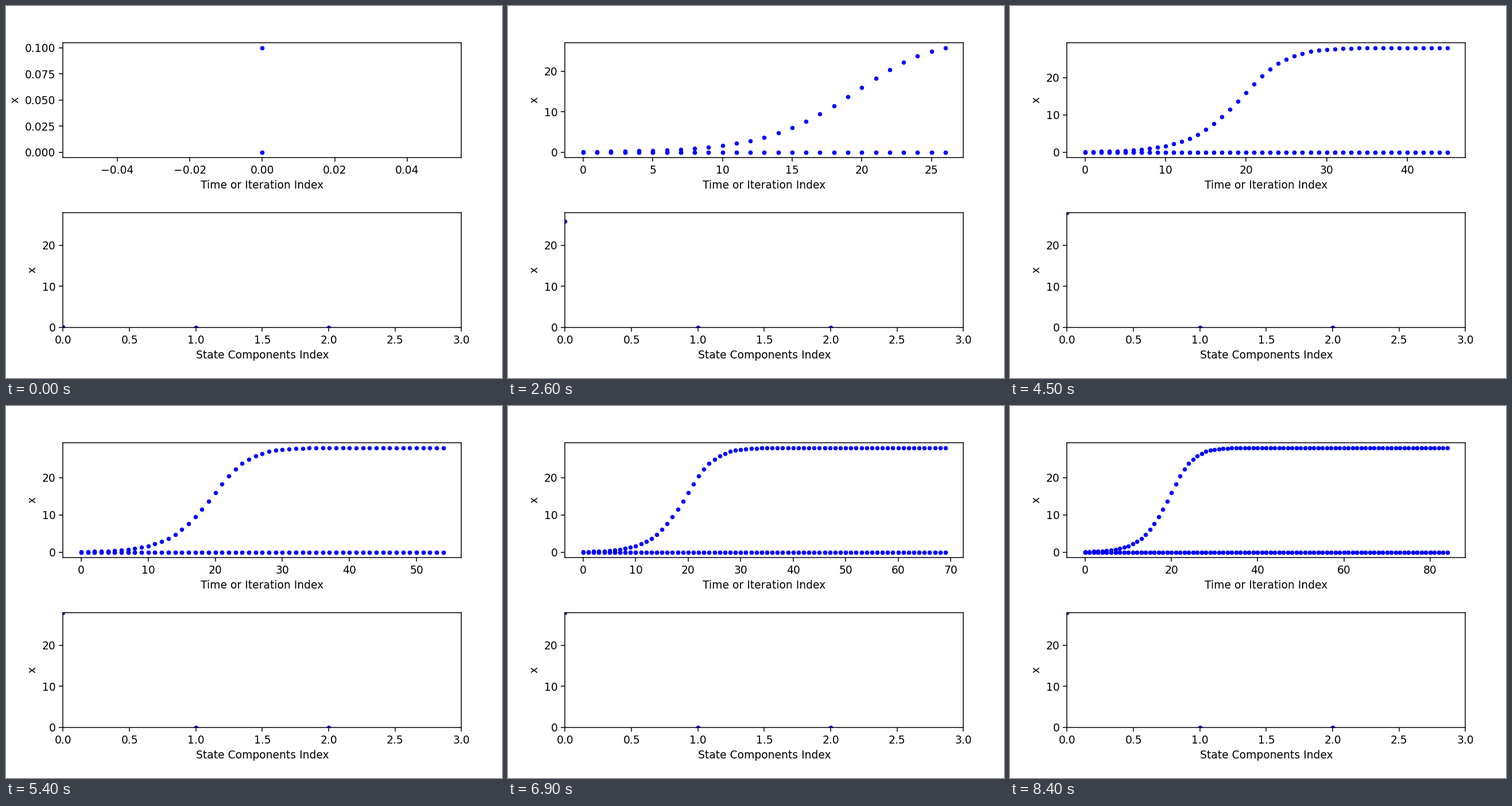
These frames come from a looping animation (864 px wide and 648 px high, 8.5 s). A matplotlib script:

```python
import numpy as np
import matplotlib.pyplot as plt
from matplotlib.animation import FuncAnimation

W, H, DPI = 864, 648, 135
STEPS = 85
RATE, CAPACITY = 0.33, 28

plt.rcParams["font.family"] = "DejaVu Sans"


def simulate():
    """Discrete logistic growth of the first of three state components."""
    states = np.zeros((STEPS, 3))
    states[0, 0] = 0.1
    for n in range(1, STEPS):
        x = states[n - 1, 0]
        states[n, 0] = x + RATE * x * (1 - x / CAPACITY)
    return states


def add_panel(top, xlabel):
    left, width, height = 99.4, 694, 200.1
    ax = fig.add_axes([left / W, 1 - (top + height) / H, width / W, height / H])
    ax.set_xlabel(xlabel)
    ax.set_ylabel("x")
    return ax


states = simulate()
fig = plt.figure(figsize=(W / DPI, H / DPI), dpi=DPI, facecolor="white")

history = add_panel(63.6, "Time or Iteration Index")
lines = [history.plot([], [], "b.")[0] for _ in range(3)]

current = add_panel(359.6, "State Components Index")
dots, = current.plot([], [], "b.")
current.set_xlim(0, 3)
current.set_ylim(0, CAPACITY)


def update(n):
    for k, line in enumerate(lines):
        line.set_data(np.arange(n + 1), states[:n + 1, k])
    history.relim()
    history.autoscale_view()
    dots.set_data(np.arange(3), states[n])
    return [*lines, dots]


anim = FuncAnimation(fig, update, frames=STEPS, interval=100,
                     repeat=True, repeat_delay=0, blit=False)
plt.show()
```
